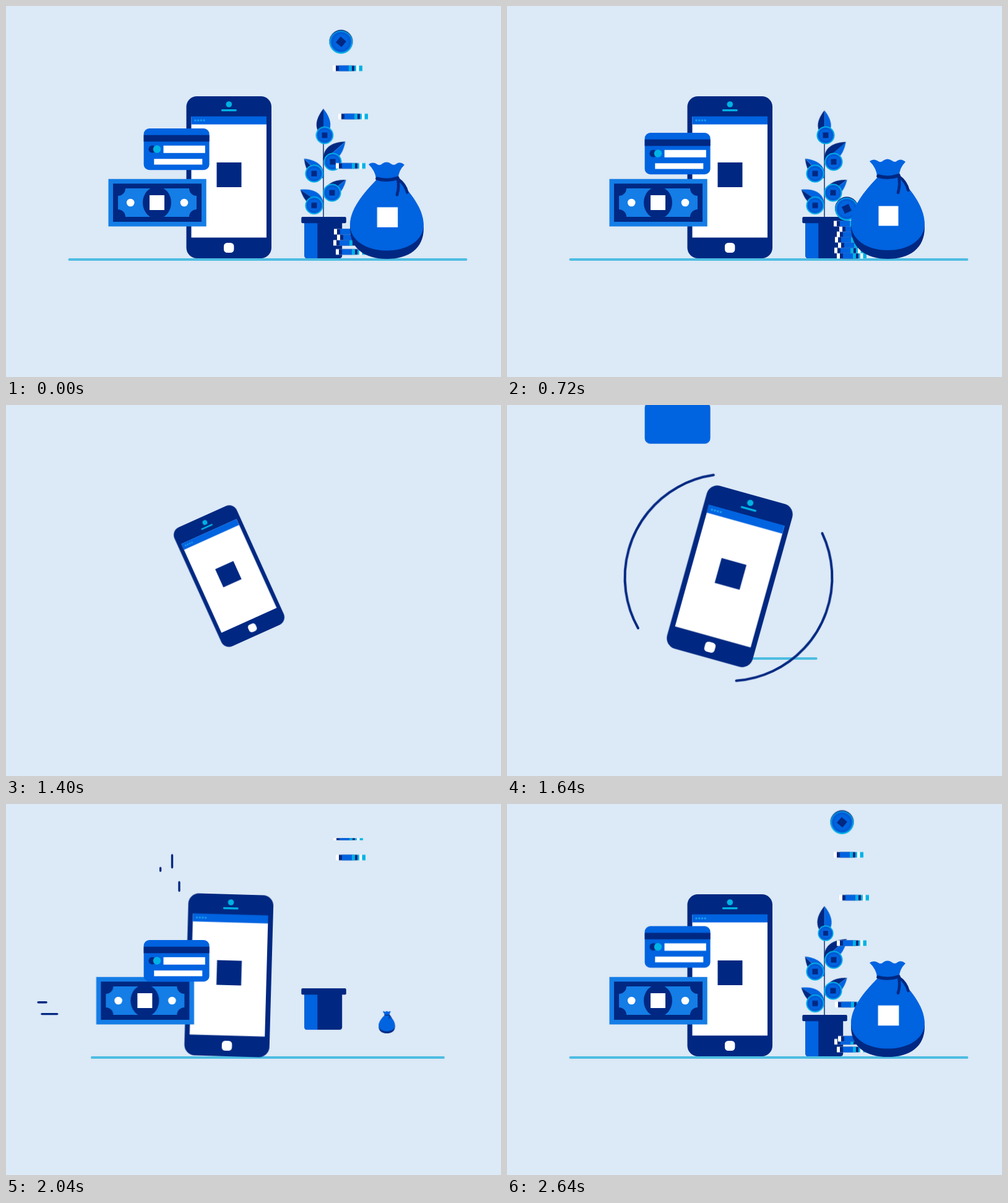
Write an HTML page that moves like this. It is 800 px wide and 600 px high and loops after 2680 ms.

```html
<!DOCTYPE html>
<html lang="en">
<head>
<meta charset="utf-8">
<title>Digital money</title>
<style>
  html, body { margin: 0; width: 100%; height: 100%; overflow: hidden; background: #dce9f6; }
  svg { display: block; width: 800px; height: 600px; }
  .navy { fill: #002882; }
  .blue { fill: #0063e0; }
  .sky { fill: #147de6; }
  .cyan { fill: #00b2e5; }
  .white { fill: #fff; }
  .ink { fill: none; stroke: #002882; stroke-linecap: round; }
  #phone { transform-origin: 360px 276px; }
  #ring { transform-origin: 358px 279px; }
  #line { transform-origin: 423px 410px; }
  #details { transform-origin: 222px 230px; }
  #drops { transform-origin: 268px 142px; }
  #dashes { transform-origin: 84px 330px; }
  #stem { transform-origin: 513px 342px; }
  #bag { transform-origin: 615.5px 409px; }
  #mark { transform-origin: 616.5px 339.5px; }
</style>
</head>
<body>
<svg viewBox="0 0 800 600">
  <defs>
    <g id="leaf">
      <path class="navy" d="M0 0C-14-10-16-26 0-46Z"/>
      <path class="blue" d="M0 0C14-10 16-26 0-46Z"/>
    </g>
    <g id="token">
      <circle class="cyan" r="14.6"/>
      <circle class="blue" r="12.8"/>
      <circle r="10.6" fill="none" stroke="#0050bd"/>
      <rect class="navy" x="-4.5" y="-4.5" width="9" height="9"/>
    </g>
    <g id="chip">
      <path class="white" d="M0-4.5h48v9H0z"/>
      <path class="navy" d="M5-4.5h30v9H5z"/>
      <path class="blue" d="M10-4.5h16v9H10z"/>
      <path class="cyan" d="M26-4.5h5v9h-5zM35-4.5h3v9h-3zM42.5-4.5H48v9h-5.5z"/>
    </g>
  </defs>

  <path id="line" d="M102.5 410H743.5" stroke="#4dbde2" stroke-width="4" stroke-linecap="round" vector-effect="non-scaling-stroke"/>

  <g id="ring" class="ink" stroke-width="4">
    <circle class="arc" cx="358" cy="279" r="167.5" pathLength="360" transform="rotate(150 358 279)"/>
    <circle class="arc" cx="358" cy="279" r="167.5" pathLength="360" transform="rotate(-26 358 279)"/>
  </g>

  <g id="phone">
    <rect class="navy" x="291.5" y="146" width="137.5" height="262" rx="17"/>
    <path class="white" d="M299.5 179H421V374.5H299.5z"/>
    <path class="blue" d="M299.5 178.5H421V191.5H299.5z"/>
    <path d="M306 185h15" fill="none" stroke="#1c97ea" stroke-width="3.6" stroke-linecap="round" stroke-dasharray="0 4.7"/>
    <circle class="cyan" cx="360.3" cy="159" r="4.8"/>
    <rect class="cyan" x="348" y="167" width="24.6" height="3.2" rx="1.2"/>
    <rect class="white" x="352" y="383" width="16.4" height="16" rx="5.5"/>
    <rect class="navy" x="340.5" y="253" width="40" height="40"/>
  </g>

  <g id="note">
    <path class="sky" d="M165.5 279.7H323.7V356.5H165.5z"/>
    <path class="navy" d="M173 287.3H316V349H173z"/>
    <path class="sky" d="M193 295H296A12 12 0 0 0 308 307V329A12 12 0 0 0 296 341H193A12 12 0 0 0 181 329V307A12 12 0 0 0 193 295Z"/>
    <ellipse class="navy" cx="244" cy="318" rx="23" ry="26"/>
    <circle class="white" cx="201.2" cy="318" r="6.3"/>
    <circle class="white" cx="288" cy="318" r="6.3"/>
    <rect class="white" x="232" y="306" width="24" height="24"/>
  </g>
  <path id="dashes" class="ink" stroke-width="3.4" d="M51.7 320.7H64.7M57.5 339.6H82.5"/>

  <path id="drops" class="ink" stroke-width="3.4" d="M268.5 82V102M249.6 102.8V107.6M280 126V140"/>
  <g id="card">
    <rect class="blue" x="222.6" y="198" width="106" height="67.2" rx="9"/>
    <g id="details">
      <path class="navy" d="M222.6 208.8H328.6V219.3H222.6z"/>
      <circle class="navy" cx="236.5" cy="231.5" r="6"/>
      <circle class="cyan" cx="244" cy="231.5" r="6.2"/>
      <path class="white" d="M254.5 225.7H321.8V237.7H254.5zM239.3 247.2H317.3V256.6H239.3z"/>
    </g>
  </g>

  <path id="stem" d="M513 342V200" stroke="#06276a" stroke-width="1.4"/>
  <g id="plant"></g>
  <g id="pot">
    <path class="navy" d="M482.3 346H543.2V403.5Q543.2 408 538.7 408H486.8Q482.3 408 482.3 403.5Z"/>
    <path class="blue" d="M482.3 350H503.3V408H486.8Q482.3 408 482.3 403.5Z"/>
    <rect class="navy" x="477.3" y="341" width="72.5" height="10.2" rx="2"/>
  </g>

  <g id="chips"></g>

  <g id="coin">
    <circle class="navy" r="19" cy="-.4"/>
    <circle class="cyan" r="18.6" cy=".6"/>
    <circle class="blue" r="16.8"/>
    <circle r="14" fill="none" stroke="#0050bd"/>
    <rect id="face" class="navy" x="-6" y="-6" width="12" height="12"/>
  </g>

  <g id="bag">
    <path class="navy" d="M600 276C585 292 556 322 556 358C556 392 580 409 615.5 409C651 409 675 392 675 358C675 322 648 292 632 276Z"/>
    <path class="blue" d="M600 276C585 292 556 322 556 352C556 378 582 395 615.5 395C649 395 675 378 675 352C675 322 648 292 632 276Z"/>
    <path class="blue" d="M586 251Q593 246 600 251Q604 254 608 250Q615 245 622 250Q627 254 631 250Q637 246 644 252Q634 262 634 275H598Q597 262 586 251Z"/>
    <path class="ink" stroke-width="5.6" d="M600 275Q616 280 633 274"/>
    <path class="ink" stroke-width="4.6" d="M633 275Q636 288 632 302M634 276Q645 284 648.5 298"/>
    <rect id="mark" class="white" x="600.5" y="323.5" width="32" height="32"/>
  </g>
</svg>

<script>
  const LOOP = 2680;
  const LEAD = 1480;   // the loop opens this far into the build-up
  const OUT = 'cubic-bezier(.3,.6,.6,1)';
  const FALL = 'cubic-bezier(.333,.161,.667,.495)';
  const $ = id => document.getElementById(id);

  // steps: [ms since the cut, value, easing to the next step]
  function play(el, steps, prop = 'transform') {
    const frames = steps.map(([ms, value, easing = 'ease-in-out']) =>
      ({ offset: ms / LOOP, [prop]: value, easing }));
    if (frames[0].offset > 0) frames.unshift({ ...frames[0], offset: 0 });
    if (frames[frames.length - 1].offset < 1) frames.push({ ...frames[frames.length - 1], offset: 1 });
    el.animate(frames, { duration: LOOP, delay: -LEAD, iterations: Infinity });
  }
  const moveX = list => list.map(([ms, v, e]) => [ms, `translateX(${v}px)`, e]);
  const moveY = list => list.map(([ms, v, e]) => [ms, `translateY(${v}px)`, e]);
  const scaleX = list => list.map(([ms, v, e]) => [ms, `scaleX(${v})`, e]);
  const scaleY = list => list.map(([ms, v, e]) => [ms, `scaleY(${v})`, e]);
  const scale = list => list.map(([ms, v, e]) => [ms, `scale(${v})`, e]);
  const show = (el, from, to) =>
    play(el, [[0, 0, 'step-end'], [from, 1, 'step-end'], [to, 0, 'step-end']], 'opacity');

  function add(parent, markup) {
    parent.insertAdjacentHTML('beforeend', markup);
    return parent.lastElementChild;
  }

  // Phone, swoosh and ground
  play($('phone'), [
    [0, 'rotate(-160deg) scale(0)', 'cubic-bezier(.3,.3,.4,1)'],
    [400, 'rotate(17deg) scale(1.05)'],
    [440, 'rotate(15.6deg) scale(1.044)', 'cubic-bezier(.4,.2,.4,1)'],
    [840, 'rotate(1.6deg) scale(1)'],
    [1160, 'rotate(-.42deg) scale(1)'],
    [1460, 'rotate(0deg) scale(1)']
  ]);
  play($('ring'), [
    [280, 'rotate(-70deg)', 'linear'], [440, 'rotate(0deg)', 'linear'], [620, 'rotate(130deg)']
  ]);
  for (const arc of document.querySelectorAll('.arc'))
    play(arc, [
      [280, '0px 360px', 'ease-out'], [440, '111px 249px', 'ease-in'], [620, '0px 360px']
    ], 'strokeDasharray');
  show($('ring'), 285, 615);

  play($('line'), scaleX([
    [360, 0, 'linear'], [440, .237, 'cubic-bezier(.3,.4,.6,.85)'], [840, .886, 'ease-out'], [1040, .99], [1240, 1]
  ]));
  play($('line'), [[0, 0, 'step-end'], [360, 1, 'step-end']], 'opacity');

  // Card and banknote
  play($('card'), moveY([
    [360, -270, 'linear'], [440, -203.5, 'cubic-bezier(.3,.5,.5,1)'], [820, 23], [840, 22],
    [1160, -1], [1440, -.5], [1480, 0], [2000, 9], [2640, -.5]
  ]));
  play($('details'), scaleX([[500, 0, 'ease-out'], [680, 1]]));
  play($('note'), moveX([[600, -330, 'linear'], [840, -20, 'ease-out'], [960, 3], [1100, 0]]));
  play($('drops'), [
    [680, 'translateY(-60px) scaleY(.4)', 'linear'], [840, 'translateY(0) scaleY(1)', 'linear'],
    [980, 'translateY(30px) scaleY(0)']
  ]);
  play($('dashes'), [
    [700, 'translateX(-50px) scaleX(.4)', 'linear'], [840, 'translateX(0) scaleX(1)', 'linear'],
    [980, 'translateX(30px) scaleX(0)']
  ]);
  show($('drops'), 680, 970);
  show($('dashes'), 700, 970);

  // Pot and plant
  play($('pot'), moveY([[560, -420, 'cubic-bezier(.4,.2,.8,.8)'], [840, -44, 'linear'], [880, 0]]));
  play($('stem'), scaleY([[920, 0, 'linear'], [1160, .84, 'ease-out'], [1300, 1]]));

  // [base x, base y, angle, size, leaf start, token x, token y, token start]
  const leaves = [
    [513, 212, 0, .94, 1180, 515, 209, 1330],
    [513, 250, 49, 1, 1120, 528, 252, 1210],
    [513, 278, -45, .96, 1040, 498, 271, 1140],
    [514, 308, 53, .97, 980, 527, 302, 1080],
    [513, 322, -56, .98, 960, 498, 322.5, 1000]
  ];
  for (const [x, y, angle, size, start] of leaves) {
    const leaf = add($('plant'), `<g transform="translate(${x} ${y}) rotate(${angle}) scale(${size})"><use href="#leaf"/></g>`);
    play(leaf.firstChild, scale([[start, 0, OUT], [start + 180, 1.11], [start + 440, 1]]));
  }
  for (const [, , , , , x, y, start] of leaves) {
    const token = add($('plant'), `<g transform="translate(${x} ${y})"><use href="#token"/></g>`);
    play(token.firstChild, scale([[start, 0, OUT], [start + 180, 1]]));
  }

  // Chips drop under gravity and bounce; the last one rides down on the pile
  const TOP = 57, V = .352, G = .00083;
  const fallTime = d => (Math.sqrt(V * V + 4 * G * d) - V) / (2 * G);
  const chips = [
    [533, 770, 7], [529, 855, 12.5], [535, 947, 20], [530, 1047, 20],
    [533, 1155, 29], [537, 1253, 43], [528, 1375, 46]
  ];
  chips.forEach(([x, born, gap], i) => {
    const rest = 404 - 8.67 * i;
    const hit = i === chips.length - 1 ? rest - gap : rest;
    const land = born + fallTime(hit - TOP);
    const chip = add($('chips'), `<g><use href="#chip"/></g>`);
    const at = y => `translate(${x}px, ${y}px)`;
    play(chip, [
      [born, at(TOP), FALL], [land, at(hit), 'ease-out'],
      [land + 180, at(rest - gap), 'ease-in'], [land + 420, at(rest)]
    ]);
    play(chip.firstChild, scaleY([[born - 30, 0, 'linear'], [born + 15, 1]]));
  });

  play($('coin'), [
    [1340, 'translate(541.5px, -44px)', 'linear'], [1480, 'translate(541.5px, 58px)', 'linear'],
    [1790, 'translate(543px, 274px)', 'ease-in'], [2060, 'translate(549px, 328px)']
  ]);
  play($('face'), [[1800, 'rotate(40deg)'], [2080, 'rotate(-25deg)']]);

  // Money bag
  play($('bag'), [
    [780, 'translateY(-20px) scale(0, 0)', 'linear'],
    [840, 'translateY(-38px) scale(.22, .22)', 'linear'],
    [1000, 'translateY(-66px) scale(.56, .56)', 'linear'],
    [1160, 'translateY(-51px) scale(.787, .787)', 'ease-in'],
    [1280, 'translateY(0) scale(1, 1)', 'ease-out'],
    [1350, 'translateY(0) scale(1.02, .94)'],
    [1440, 'translateY(0) scale(1, .963)', 'linear'],
    [1480, 'translateY(0) scale(1, .969)', 'ease-out'],
    [1680, 'translateY(0) scale(1, 1)']
  ]);
  play($('mark'), scale([[1200, 0, 'ease-out'], [1400, 1.06], [1640, 1]]));
</script>
</body>
</html>
```
